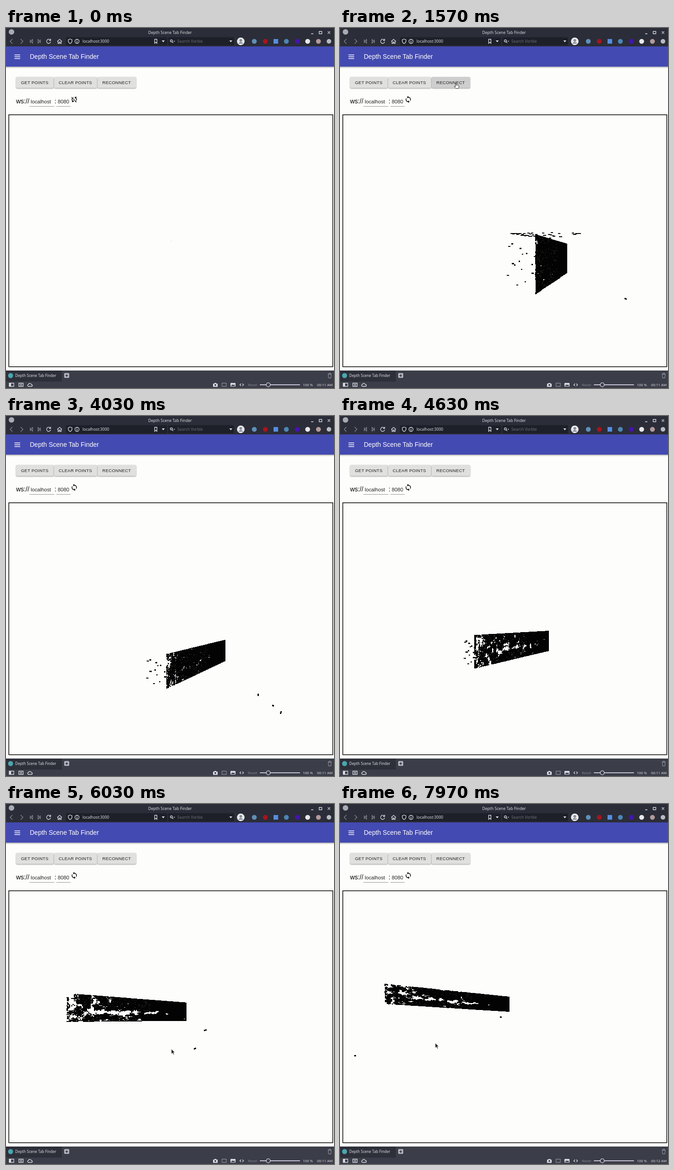
These frames come from a looping animation (716x783 px, 8000 ms). An HTML page with a canvas:

```html
<!DOCTYPE html>
<html lang="en">
<head>
<meta charset="utf-8">
<title>Depth Scene Tab Finder</title>
<style>
  html, body { margin: 0; width: 100%; height: 100%; overflow: hidden; background: #fdfdfc; }
  svg, canvas { position: absolute; left: 0; top: 0; width: 716px; height: 783px; }
  .ui { font-family: "Noto Sans", "Open Sans", sans-serif; font-size: 8.6px; fill: #dcdde2; }
  .status { font-size: 7.8px; }
  .page { font-family: "Liberation Sans", Arial, sans-serif; fill: #222; }
  .btn { font-size: 9.5px; letter-spacing: .27px; }
  .btn rect { fill: #e0e0de; filter: drop-shadow(0 1px 1px rgba(0,0,0,.42)); }
  .line { fill: none; stroke: #dcdde2; stroke-width: 1.3; }
  .dim { stroke: #858791; }
</style>
</head>
<body>
<svg viewBox="0 0 716 783">
  <defs>
    <linearGradient id="shade" x2="0" y2="1">
      <stop stop-color="#000" stop-opacity=".3"/><stop offset="1" stop-color="#000" stop-opacity="0"/>
    </linearGradient>
  </defs>

  <!-- browser frame -->
  <rect width="716" height="40" fill="#2b2d38"/>
  <circle cx="12" cy="8.5" r="6" fill="#a9abb3"/>
  <g class="ui">
    <text x="358" y="13" text-anchor="middle">Depth Scene Tab Finder</text>
    <path class="line" d="M666 12.5h5M683.5 7.500h6v5h-6zM702.5 7.500l5 5m0-5l-5 5"/>
    <path class="line dim" d="M14 24l-5 5 5 5M32 24l5 5-5 5M53 25v8M58 25l-4 4 4 4zM75 25v8M70 25l4 4-4 4z"/>
    <path class="line" d="M96.5 26a4.5 4.500 0 1 0 1 4M97.5 23.500v3.500h-3.500M112 29l5-4.500 5 4.500M113.5 28v5.500h2.500v-3h2v3h2.500v-5.500"/>
    <rect x="131" y="20" width="221" height="18" rx="3" fill="#1e2029"/>
    <rect x="354" y="20" width="144" height="18" rx="3" fill="#1e2029"/>
    <path class="line" d="M140 24l4 1.500v3q0 3-4 5.500-4-2.500-4-5.500v-3zM155 28v4M155 25.500v1.200M324.5 24.500h5v9l-2.500-2.500-2.500 2.500z"/>
    <circle class="line" cx="155" cy="29" r="4.500"/>
    <text x="167" y="32">localhost:3000</text>
    <path d="M340 27h6.500l-3.200 4zM487.5 27h6.500l-3.200 4zM365.5 28h3.500l-1.700 2z"/>
    <circle class="line" cx="361" cy="28" r="2.300"/><path class="line" d="M362.5 29.800l2.500 2.700"/>
    <text x="374" y="32" style="fill:#6b6d78">Search Vorble</text>
    <circle cx="512.5" cy="29" r="8.300" fill="#e8e9ec"/>
    <circle cx="512.5" cy="27" r="3" fill="#888b95"/><path d="M507 34q5.500-7 11 0z" fill="#888b95"/>
    <circle cx="542" cy="29" r="5.300" fill="#5f8fb8"/>
    <circle cx="566" cy="29" r="5.300" fill="#a3161c"/>
    <rect x="584" y="24" width="10" height="10" fill="#558ee0"/>
    <circle cx="612" cy="29" r="5.300" fill="#4c86b5"/>
    <circle cx="635.5" cy="29" r="5.300" fill="#4514ad"/>
    <circle cx="658.5" cy="29" r="5.300" fill="#e9e9ec"/>
    <circle cx="682" cy="29" r="5.300" fill="#b39a9a"/>
    <circle cx="705" cy="29" r="5" fill="#b9bbc3"/>
  </g>

  <!-- page -->
  <rect y="40" width="716" height="44" fill="#434ab1"/>
  <rect y="84" width="716" height="4" fill="url(#shade)"/>
  <path d="M18.5 58.500h12.500M18.5 62.500h12.500M18.5 66.500h12.500" stroke="#fff" stroke-width="1.500"/>
  <g class="page">
    <text x="52" y="67" font-size="14" fill="#fff">Depth Scene Tab Finder</text>
    <g class="btn">
      <rect x="22" y="106.500" width="82" height="24" rx="2.500"/><text x="32.700" y="121.700">GET POINTS</text>
      <rect x="105" y="106.500" width="94" height="24" rx="2.500"/><text x="115" y="121.700">CLEAR POINTS</text>
      <rect id="reconnect" x="200" y="106.500" width="84" height="24" rx="2.500"/><text x="210.300" y="121.700">RECONNECT</text>
    </g>
    <text x="22" y="164" font-size="14" fill="#000">ws://</text>
    <text x="54" y="163.500" font-size="11.200">localhost</text>
    <text x="106" y="164" font-size="14" fill="#000">:</text>
    <text x="113" y="163.500" font-size="11.200">8080</text>
    <path d="M51 170.500h54.500M110 170.500h31" stroke="#949494"/>
  </g>
  <g transform="translate(140.6 147) scale(.7)">
    <path id="online" d="M12 4V1L8 5l4 4V6c3.310 0 6 2.690 6 6 0 1.010-.25 1.970-.7 2.800l1.460 1.460C19.540 15.030 20 13.570 20 12c0-4.420-3.580-8-8-8zm0 14c-3.310 0-6-2.690-6-6 0-1.010.25-1.970.7-2.800L5.240 7.740C4.460 8.970 4 10.430 4 12c0 4.420 3.580 8 8 8v3l4-4-4-4v3z"/>
    <path id="offline" d="M10 6.350V4.260c-.8.210-1.550.54-2.230.96l1.460 1.460c.25-.12.5-.24.77-.33zM2.860 5.410l2.360 2.360C4.450 8.990 4 10.440 4 12c0 2.210.91 4.200 2.360 5.640L4 20h6v-6l-2.240 2.240C6.680 15.150 6 13.660 6 12c0-1 .25-1.940.68-2.770l8.080 8.080c-.25.13-.5.25-.77.34v2.090c.8-.21 1.550-.54 2.230-.96l2.360 2.360 1.270-1.270L4.140 4.140zM20 4h-6v6l2.240-2.240C17.320 8.850 18 10.340 18 12c0 1-.25 1.940-.68 2.770l1.460 1.460C19.550 15.010 20 13.560 20 12c0-2.210-.91-4.200-2.360-5.640z"/>
  </g>
  <rect x="6.200" y="188.700" width="707.200" height="548" fill="none" stroke="#000" stroke-width="1.500"/>

  <!-- tab strip and status bar -->
  <rect y="745" width="716" height="38" fill="#3b3e48"/>
  <rect y="745" width="122" height="24" fill="#2d2f39"/>
  <g class="ui">
    <circle cx="10" cy="756" r="5.500" fill="#4aa6ae"/>
    <text x="20" y="759" style="font-size:8.1px">Depth Scene Tab Finder</text>
    <rect x="127" y="750.500" width="11" height="10.500" rx="2" fill="#b5b7bf"/>
    <path d="M132.5 753v6M129.5 756h6" stroke="#2b2d38" stroke-width="1.500"/>
    <path class="line dim" d="M702.5 753h8.500M705 752.500v-1.500h3.500v1.500M703.5 753.500l.7 7.500h5l.7-7.500"/>
  </g>
  <g class="ui status">
    <path class="line" d="M7 772.500h10v7h-10zM28 772.500h9.500v7h-9.500zM31.5 774v4M34 774v4M49 779.500h6.500a2 2 0 0 0 0-4 3.500 3.500 0 0 0-6.500-.5 2.300 2.300 0 0 0 0 4.500z"/>
    <path d="M7 772.500h4v7h-4zM452 773.500h2.500l1-1.500h3l1 1.500h2.500v7h-10z"/>
    <circle cx="457" cy="776.500" r="2" fill="#3b3e48"/>
    <path class="line dim" d="M471.5 772.500h9.500v7h-9.500z"/>
    <rect x="490" y="772" width="11" height="8" rx="1"/>
    <path d="M491 779l3-4 2 2 2-2 2 4z" fill="#3b3e48"/>
    <path class="line" d="M513 773.500l-2.500 2.500 2.500 2.500M516 773.500l2.500 2.500-2.500 2.500"/>
    <text x="528" y="779" style="fill:#858791">Reset</text>
    <rect x="554" y="775" width="88" height="2" rx="1" fill="#c6c2d8"/>
    <circle cx="572.500" cy="776" r="4.300" fill="#3b3e48" stroke="#dcdde2" stroke-width="1.300"/>
    <text x="648" y="779">100 %</text>
    <text id="clock" x="679" y="779">00:11 AM</text>
  </g>
</svg>
<canvas width="716" height="783"></canvas>
<svg viewBox="0 0 716 783">
  <g id="cursor" stroke-linejoin="round">
    <path id="arrow" d="M0 0v10.500l2.500-2.300 2 4 1.700-.8-2-3.900h3.300z" fill="#252525" stroke="#f4f4f4" stroke-width=".6"/>
    <path id="hand" d="M-.8 1q1-1.500 2 0v3.500l1-.3 1 .5 1-.2 1 .6 1.300.3v3.600l-1 2.500h-5.500l-3.500-4.200q0-1.200 1.200-.9l1.500 1.200z" fill="#fff" stroke="#222" stroke-width=".9"/>
  </g>
</svg>
<script>
const LOOP = 8000, STEP = 100 / 3, CONNECT = 1050, FIRST_POINTS = 1200;
const DRAG_START = 3300, DRAG_END = 4650, NEXT_MINUTE = 7480;
const $ = id => document.getElementById(id);
const ctx = document.querySelector("canvas").getContext("2d");
const mix = (a, b, k) => a + (b - a) * k;
const clamp = k => Math.max(0, Math.min(1, k));
const smooth = k => k * k * (3 - 2 * k);
const ramp = (t, from, to) => clamp((t - from) / (to - from));

// The cloud is a slab seen in perspective; each edge is x, top, bottom.
const poses = [
  { at: 1570, near: [427, 450, 576], far: [495, 470, 532], strays: [[622, 589], [382, 514]] },
  { at: 2800, near: [411, 458, 584], far: [485, 476, 540], strays: [[357, 484]] },
  { at: 4030, near: [350, 520, 592], far: [478, 488, 532], strays: [[551, 605], [581, 629], [598, 644]] },
  { at: 5230, near: [232, 430, 500], far: [430, 446, 486], strays: [[214, 464]] },
  { at: 6030, near: [129, 412, 472], far: [390, 432, 470], strays: [[434, 491], [411, 531]] },
  { at: 6720, near: [98, 392, 434], far: [368, 420, 451], strays: [[349, 462], [30, 545]] }
];

const moves = [
  { from: 250, to: 950, x: 253, y: 120 },
  { from: 1800, to: 2350, x: 246, y: 278 },
  { from: DRAG_START, to: DRAG_END, x: 361, y: 533 },
  { from: 6750, to: 7500, x: 208, y: 520 }
];

function hash(x, y, z) {
  let n = Math.imul(x, 374761393) ^ Math.imul(y, 668265263) ^ Math.imul(z, 2147378919);
  n = Math.imul(n ^ (n >>> 13), 1274126177);
  n = Math.imul(n ^ (n >>> 15), 2246822519);
  return ((n ^ (n >>> 16)) >>> 0) / 4294967296;
}

function noise(x, y, z) {
  const i = Math.floor(x), j = Math.floor(y), k = Math.floor(z);
  const fx = smooth(x - i), fy = smooth(y - j);
  const layer = q => mix(mix(hash(i, j, q), hash(i + 1, j, q), fx),
    mix(hash(i, j + 1, q), hash(i + 1, j + 1, q), fx), fy);
  return mix(layer(k), layer(k + 1), smooth(z - k));
}

function slabAt(t) {
  const i = Math.max(1, poses.findIndex(pose => pose.at > t));
  const [a, b] = t >= poses.at(-1).at ? poses.slice(-2) : [poses[i - 1], poses[i]];
  const k = ramp(t, a.at, b.at);
  const edge = name => a[name].map((n, j) => mix(n, b[name][j], k));
  return { near: edge("near"), far: edge("far") };
}

function dot(x, y, w, h) {
  ctx.fillRect(Math.round(x), Math.round(y), w, h);
}

function drawSlab({ near, far }, t) {
  const cols = 100, rows = 38, width = far[0] - near[0];
  const spread = ramp(width, 100, 200);
  const dotWidth = Math.max(2, Math.ceil(width / cols));
  for (let c = 0; c < cols; c++) {
    const u = c / (cols - 1);
    const [x, top, bottom] = near.map((n, j) => mix(n, far[j], u));
    const dotHeight = Math.max(2, Math.ceil((bottom - top) / rows));
    const density = mix(mix(.62, .38, spread), .98, Math.sqrt(u));
    for (let r = 0; r < rows; r++) {
      const v = r / (rows - 1), grain = hash(c, r, 7);
      const band = .62 + .12 * (noise(u * 9, 0, t / 600) - .5);
      const channel = spread * clamp(1 - Math.abs(v - band) * 7) * clamp(Math.sin(u * Math.PI) * 2 - .7);
      const clump = .7 * noise(c / 3, r / 5, t / 420) + .3 * grain;
      if (clump > .5 + (density - channel * .6 - .5) * .8) continue;
      ctx.fillStyle = grain > .92 && u < .7 ? (c % 2 ? "#20202b" : "#25251c") : "#030303";
      dot(x - 1, mix(top, bottom, v) - 1, dotWidth, dotHeight);
    }
  }
  for (let i = 0; i < 16; i++) {
    const away = hash(i, 1, 4) ** 2 * 65 * (1 - spread);
    dot(near[0] - away, mix(near[1], near[2], hash(i, 2, 4)), 3 + i % 3, 2 + i % 2);
  }
}

// A thin line of far points above the slab, flattening as the view turns.
function drawHorizon(t) {
  const turn = ramp(t, 1570, 2800), count = 70;
  for (let i = 0; i < count; i++) {
    const u = i / count, sag = Math.sin(u * Math.PI);
    const density = mix(.7, .4, u) * ramp(t, DRAG_START, 2800);
    if (noise(i / 2, 3, 1) > density) continue;
    const sway = (hash(i, 5, 2) - .5) * 12 * sag;
    dot(mix(mix(372, 523, u), mix(393, 485, u), turn), mix(446 + 4 * sag + sway, 457, turn), 5, 2);
  }
}

function drawStrays(t) {
  for (const { at, strays } of poses) {
    const settled = at === poses.at(-1).at && t > at;
    if (Math.abs(t - at) > 350 && !settled) continue;
    for (const [x, y] of strays)
      for (let i = 0; i < 2; i++)
        dot(x - 2 + hash(x, i, 5) * 4, y - 2 + hash(y, i, 6) * 3, 3, 3);
  }
}

function drawCloud(t) {
  ctx.clearRect(0, 0, 716, 783);
  if (t < FIRST_POINTS) {
    ctx.fillStyle = "#c8c8c6";
    dot(360, 463, 2, 1);
    return;
  }
  drawSlab(slabAt(t), t);
  ctx.fillStyle = "#0a0a0c";
  drawHorizon(t);
  drawStrays(t);
}

function drawCursor(t) {
  let x = 410, y = 330;
  for (const move of moves) {
    const k = smooth(ramp(t, move.from, move.to));
    x = mix(x, move.x, k);
    y = mix(y, move.y, k);
  }
  const visible = t >= moves[0].from && (t < DRAG_START || t > DRAG_END);
  const hover = visible && x > 200 && x < 284 && y > 106 && y < 131;
  const focused = t > CONNECT && t < DRAG_START;
  show("cursor", visible);
  show("hand", hover);
  show("arrow", !hover);
  $("cursor").setAttribute("transform", `translate(${x} ${y})`);
  $("reconnect").style.fill = hover ? "#cecece" : focused ? "#d4d4d3" : "";
}

function show(id, on) {
  $(id).style.display = on ? "" : "none";
}

let lastStep = -1;
function frame() {
  const step = Math.floor(performance.now() % LOOP / STEP);
  if (step !== lastStep) {
    lastStep = step;
    const t = step * STEP;
    drawCloud(t);
    drawCursor(t);
    show("online", t >= CONNECT);
    show("offline", t < CONNECT);
    $("clock").textContent = t < NEXT_MINUTE ? "00:11 AM" : "00:12 AM";
  }
  requestAnimationFrame(frame);
}
frame();
</script>
</body>
</html>
```
